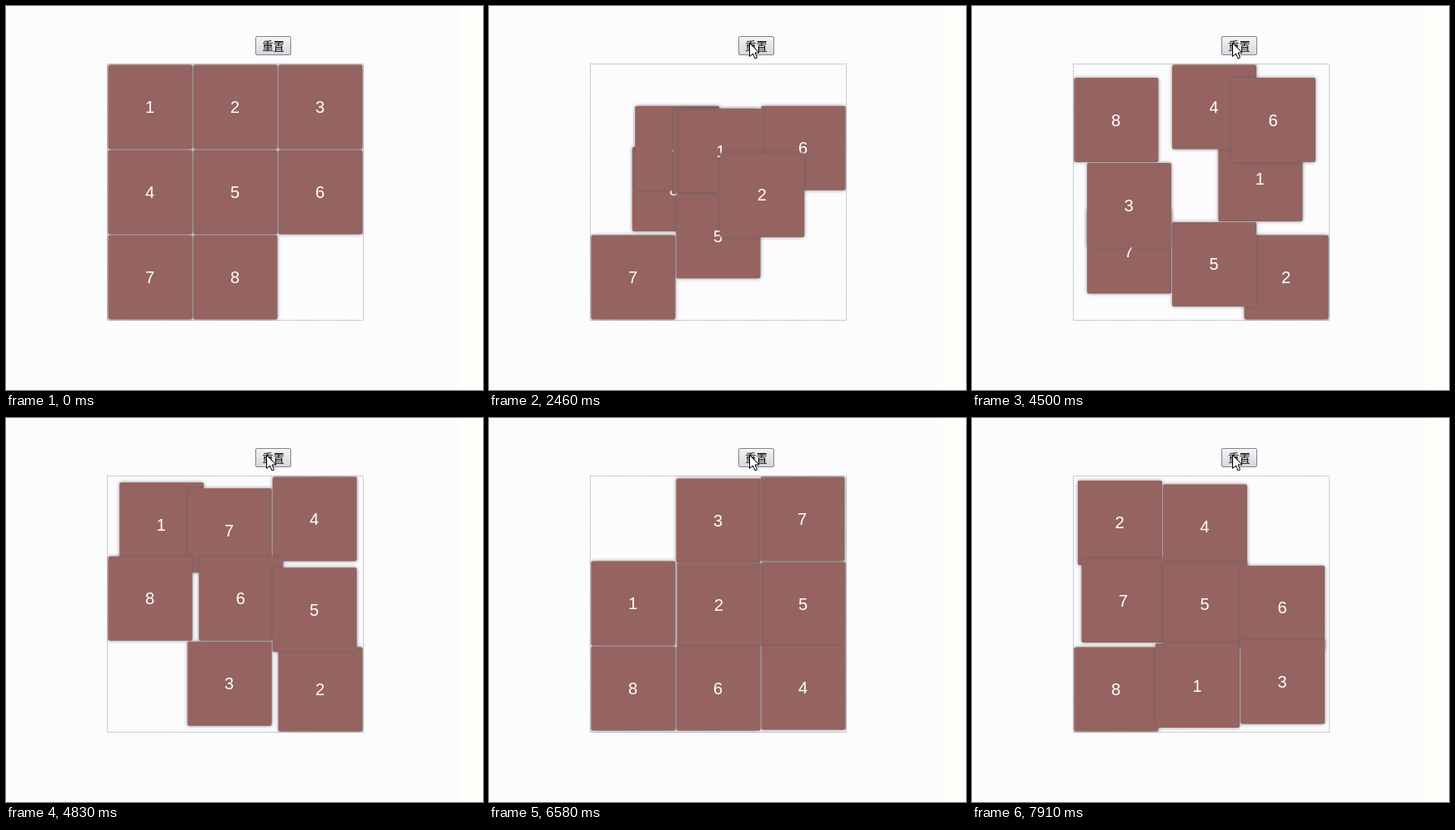
An HTML page with a canvas for the animation above (8000 ms loop, 572 px wide and 460 px high).

```html
<!DOCTYPE html>
<html lang="zh-CN">
<head>
<meta charset="utf-8">
<style>
  html, body { margin: 0; width: 100%; height: 100%; overflow: hidden; background: #fcfcfe; }
  canvas { display: block; width: 572px; height: 460px; }
</style>
</head>
<body>
<canvas id="stage" width="572" height="460"></canvas>
<script>
const ctx = document.getElementById('stage').getContext('2d');
const LOOP = 8000, SLIDE = 600, PITCH = 102, LEFT = 122, TOP = 70;

// Board order by row; "_" is the empty cell
const boards = ['12345678_', '8463_1752', '174865_32', '_37125864', '24_756813'];
const starts = [2280, 4421, 6058, 7468];
const presses = [[2160, 2270], [4160, 4410], [5960, 6050], [7350, 7460]];

// Pointer path: time, x, y of the tip
const path = [
  [40, 291, 43], [300, 222, 100], [520, 177, 180], [830, 219, 256],
  [1080, 360, 205], [1330, 518, 110], [1520, 430, 62], [1710, 340, 46], [1900, 312, 44]
];

const lerp = (a, b, p) => a + (b - a) * p;

// cubic-bezier(.25, .1, .25, 1)
function ease(x) {
  if (x <= 0) return 0;
  if (x >= 1) return 1;
  const curve = (s, a, b) => 3 * (1 - s) * (1 - s) * s * a + 3 * (1 - s) * s * s * b + s * s * s;
  let lo = 0, hi = 1;
  for (let i = 0; i < 24; i++) {
    const mid = (lo + hi) / 2;
    if (curve(mid, 0.25, 0.25) < x) lo = mid; else hi = mid;
  }
  return curve(lo, 0.1, 1);
}

function drawTile(label, x, y) {
  ctx.save();
  ctx.shadowColor = 'rgba(84, 88, 100, 0.7)';
  ctx.shadowBlur = 4;
  ctx.fillStyle = '#956460';
  ctx.beginPath();
  ctx.roundRect(x + 0.5, y + 0.5, 101, 101, 2);
  ctx.fill();
  ctx.restore();
  ctx.fillStyle = '#fff';
  ctx.font = '20px "Liberation Sans", Arial, sans-serif';
  ctx.fillText(label, x + 50.5, y + 58);
}

function drawBoard(t) {
  ctx.save();
  ctx.strokeStyle = '#b4b4b8';
  ctx.lineWidth = 1;
  ctx.setLineDash([2, 1]);
  ctx.strokeRect(121.5, 69.5, 307, 307);
  ctx.setLineDash([]);
  ctx.beginPath();
  ctx.rect(121, 69, 308, 308);
  ctx.clip();

  const step = starts.filter(s => t >= s).length;
  const to = boards[step], from = boards[Math.max(0, step - 1)];
  const p = step ? ease((t - starts[step - 1]) / SLIDE) : 1;
  const tiles = [...to].filter(c => c !== '_').map(label => {
    const a = from.indexOf(label), b = to.indexOf(label);
    return {
      label,
      moving: a !== b && p < 1,
      x: LEFT + PITCH * lerp(a % 3, b % 3, p),
      y: TOP + PITCH * lerp(Math.floor(a / 3), Math.floor(b / 3), p)
    };
  });
  // Sliding tiles pass above resting ones
  tiles.sort((a, b) => a.moving - b.moving);
  tiles.forEach(k => drawTile(k.label, k.x, k.y));
  ctx.restore();
}

function drawButton(t) {
  const down = presses.some(([a, b]) => t >= a && t < b);
  const g = ctx.createLinearGradient(0, 37, 0, 58);
  g.addColorStop(0, down ? '#e2e2e6' : '#f4f4f6');
  g.addColorStop(1, down ? '#f2f2f5' : '#d6d6dc');
  ctx.fillStyle = g;
  ctx.strokeStyle = '#85858a';
  ctx.lineWidth = 1;
  ctx.beginPath();
  ctx.roundRect(299.5, 36.5, 42, 22, 1.5);
  ctx.fill();
  ctx.stroke();
  ctx.fillStyle = '#000';
  ctx.font = '13.33px "Noto Sans CJK SC", "Noto Sans CJK", sans-serif';
  ctx.fillText('重置', 320.5, 53);
}

function pointerAt(t) {
  const i = path.findIndex(k => k[0] > t);
  if (i < 0) return path[path.length - 1].slice(1);
  const a = path[i - 1], b = path[i], p = (t - a[0]) / (b[0] - a[0]);
  return [1, 2].map(k => Math.round(lerp(a[k], b[k], p)));
}

function drawPointer(t) {
  if (t < path[0][0]) return;
  const [x, y] = pointerAt(t);
  const shape = [[0, 0], [0, 16], [4, 12.5], [6.5, 18.5], [9, 17.5], [6.5, 11.5], [11.5, 11.5]];
  ctx.beginPath();
  shape.forEach(([dx, dy]) => ctx.lineTo(x + 0.5 + dx, y + 0.5 + dy));
  ctx.closePath();
  ctx.fillStyle = '#fff';
  ctx.strokeStyle = '#000';
  ctx.lineWidth = 1;
  ctx.fill();
  ctx.stroke();
}

function draw(t) {
  ctx.textAlign = 'center';
  ctx.textBaseline = 'alphabetic';
  ctx.fillStyle = '#fcfcfe';
  ctx.fillRect(0, 0, 572, 460);
  ctx.fillStyle = '#fefefb';
  ctx.fillRect(544, 0, 28, 460);
  drawBoard(t);
  drawButton(t);
  drawPointer(t);
}

const begin = performance.now();
function tick() {
  draw((performance.now() - begin) % LOOP);
  requestAnimationFrame(tick);
}
tick();
</script>
</body>
</html>
```
